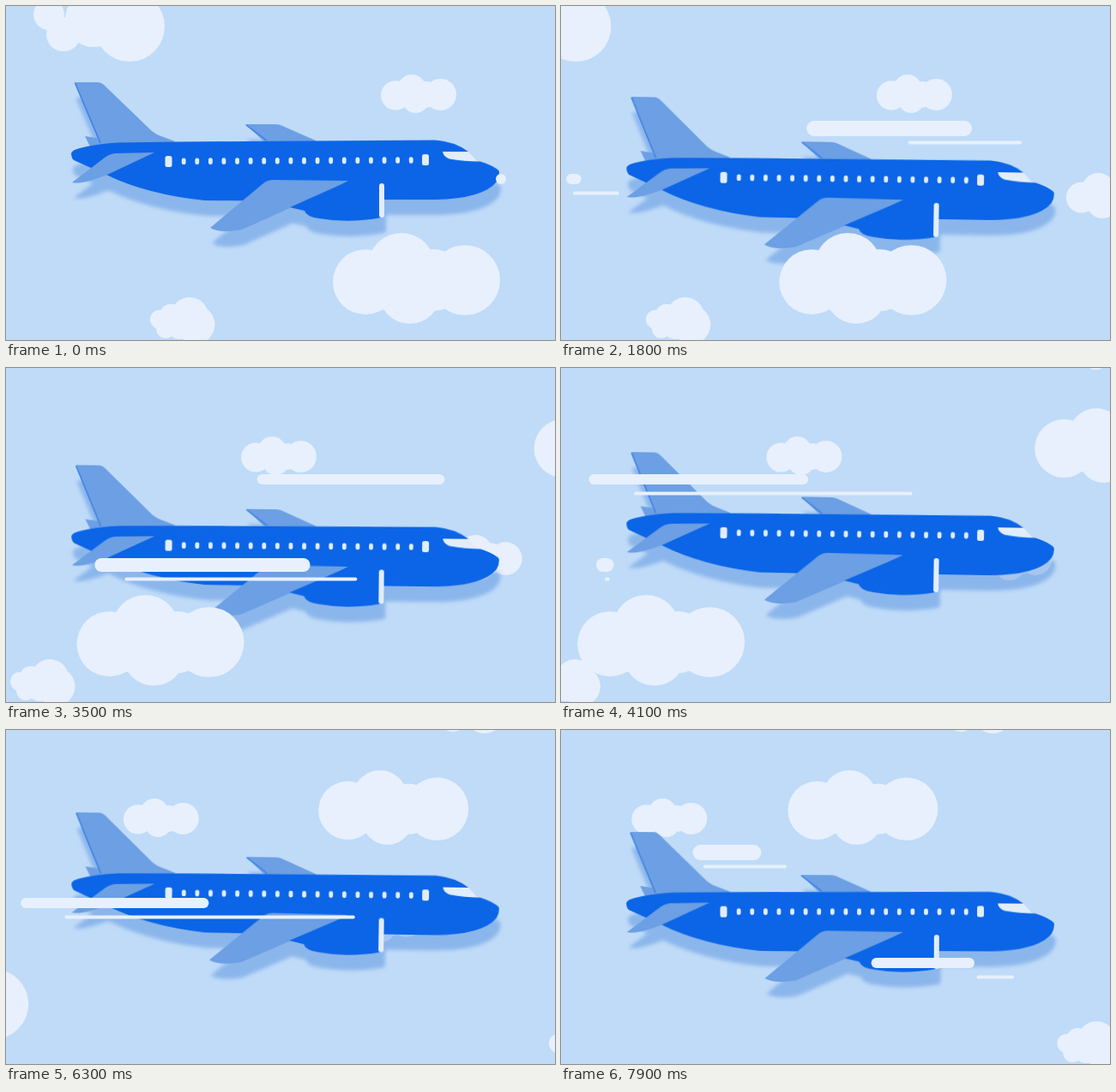
Animation, 640 px wide and 390 px high, one loop 8 s. Source, as an HTML page:

```html
<!DOCTYPE html>
<html lang="en">
<head>
<meta charset="utf-8">
<title>Plane in the clouds</title>
<style>
  html, body { margin: 0; width: 100%; height: 100%; overflow: hidden; background: #bfdbf8; }
  svg { display: block; width: 640px; height: 390px; }
  .cloud { fill: #e7f0fc; }
  .streak { stroke: #e7f0fc; stroke-linecap: round; }
  .body { fill: #0b65e6; }
  .wing { fill: #6c9fe3; }
  .pale { fill: #e2edfc; }
  .edge { fill: none; stroke: #3c80e5; stroke-width: 1.5; }
  #plane { filter: drop-shadow(2px 18px 2px rgba(20, 95, 205, .3)); }
</style>
</head>
<body>
<svg viewBox="0 0 640 390">
  <rect width="640" height="390" fill="#bfdbf8"/>
  <g id="back"></g>
  <g id="plane">
    <path class="wing" d="M80 89H107Q111 89 114 92L170 146Q175 150 181 152L197 158L185 164H111Z"/>
    <path class="wing" d="M92 152L106 154L112 164H98Z"/>
    <path class="edge" d="M80.5 90L110 160"/>
    <path class="wing" d="M279 138H313Q317 138 320 139L361 157V161H304Z"/>
    <path class="edge" d="M280 139L304 157"/>
    <path class="pale" d="M507 168H537L550 182H512Z"/>
    <path class="body" d="M76 172Q77 168 86 166Q104 161 130 159.5L200 158.5L500 156.5Q523 158 539 170H509Q510 176 517 178.5Q534 181.5 553 181.5Q575 189 575 194Q575 200 572 205Q556 225 500 226H440L300 227.5L232 227Q164 220 117 197L79 180Q76 177 76 172Z"/>
    <path class="wing" d="M173 171L127 172Q120 173 115 177L77 206Q88 209 118 197Z"/>
    <path class="wing" d="M399 204L311 203Q305 203 300 207L238 259Q250 266 275 261L333 235L350 230Z"/>
    <path class="body" d="M331 235L398 205H434L437 208V247Q400 254 365 248Q350 246 348 239Z"/>
    <rect class="pale" x="435" y="207" width="6" height="40" rx="3"/>
    <rect class="pale" x="185.5" y="175" width="8" height="13" rx="2.5"/>
    <rect class="pale" x="485" y="173" width="8" height="13" rx="2.5"/>
    <g id="windows"></g>
  </g>
  <g id="streaks"></g>
  <g id="front"></g>
</svg>
<script>
const $ = id => document.getElementById(id);

function add(parent, tag, attrs) {
  const el = document.createElementNS('http://www.w3.org/2000/svg', tag);
  for (const key in attrs) el.setAttribute(key, attrs[key]);
  return parent.appendChild(el);
}

for (let i = 0; i < 18; i++) {
  add($('windows'), 'rect', { class: 'pale', x: 204.8 + i * 15.59, y: 177.5 - i * 0.08, width: 4.8, height: 7.6, rx: 2.2 });
}

// Four lobes (left, top, bottom, right) and two fillers, as [x, y, r]
const puff = (w, h) => [
  [0.195 * w, 0.54 * h, 0.195 * w],
  [0.41 * w, 0.37 * h, 0.37 * h],
  [0.46 * w, 0.66 * h, 0.34 * h],
  [0.79 * w, 0.52 * h, 0.21 * w],
  [0.6 * w, 0.52 * h, 0.34 * h],
  [0.33 * w, 0.55 * h, 0.3 * h]
];
const low = [[11, 26, 11], [24, 21, 13], [18, 37, 11], [46, 22, 22], [53, 32, 22.5], [34, 35, 14]];
const corner = [[18, 10, 18], [35, 33, 20], [112, 24, 41], [70, 15, 33]];
const tip = [[16, -14, 16], [53, -18, 22]];

const clouds = [];
function cloud(layer, shape, x, y, speed) {
  const el = add($(layer), 'g', { class: 'cloud' });
  for (const [cx, cy, r] of shape) add(el, 'circle', { cx, cy, r });
  clouds.push({ el, x, y, speed });
}
const NEAR = 1, FAR = 0.546;
cloud('back', corner, 32, 0, NEAR);
cloud('back', puff(88, 45), 437, 80, FAR);
cloud('back', puff(92, 53), 647, 195, 0.46);
cloud('back', puff(175, 87), 914, 47, NEAR);
cloud('back', tip, 805, 0, FAR);
cloud('back', low, 168, 340, FAR);
cloud('back', low, 933, 340, FAR);
cloud('front', puff(195, 106), 381, 265, NEAR);

const streaks = [];
function streak(y, width, from, to, start, span) {
  const el = add($('streaks'), 'line', { class: 'streak', y1: y, y2: y, 'stroke-width': width });
  streaks.push({ el, from, to, start, span });
}
// A thick streak and the thin one that trails it
function gust(y, width, from, to, start, span, lag) {
  streak(y, width, from, to, start, span);
  streak(y + 16.5, 4, from + 50, to + 4, start + lag, span * 0.9);
}
gust(143, 18, 486, 162, 104, 88, 12);
gust(202, 12, 577, 12, 0, 112, 26);
gust(272, 12, 476, 10, 176, 66, 4);
gust(130, 12, 510, 11, 275, 140, 25);
gust(230, 16, 440, 49, 255, 95, 8);

const PERIOD = 468;
const clamp = u => Math.min(1, Math.max(0, u));
const easeOut = u => 1 - (1 - clamp(u)) ** 3;
const easeSine = u => (1 - Math.cos(Math.PI * clamp(u))) / 2;

// Distance flown: a steady pace that swells in the middle of the loop
const swell = step => 28 * Math.sin((step - 33) * Math.PI / 38);
const distance = step => 8.38 * step + swell(step) - swell(0);

function drawStreak(s, phase) {
  const u = (phase - s.start) / s.span;
  const on = u >= 0 && u < 1.2;
  s.el.setAttribute('visibility', on ? 'visible' : 'hidden');
  if (!on) return;
  const at = f => s.from + (s.to - s.from) * f;
  const head = at(easeOut(u));
  const tail = at(easeSine((u - 0.1) / 1.1));
  s.el.setAttribute('x1', head);
  s.el.setAttribute('x2', Math.max(tail, head + 0.01));
}

function draw(ms) {
  let step = Math.floor((ms % 8000) / 100);
  if (step >= 15) step--;   // one picture is held twice as long
  const d = distance(step);

  for (const c of clouds) c.el.setAttribute('transform', `translate(${c.x - c.speed * d} ${c.y})`);

  // Bob up and down, nose dipping between the two extremes
  const swing = 2 * Math.PI * (d + 7) / PERIOD;
  const bob = 17.3 * (1 - Math.cos(swing));
  const tilt = Math.sin(swing) ** 2;
  $('plane').setAttribute('transform', `translate(0 ${bob}) rotate(${tilt} 330 190)`);

  for (const s of streaks) drawStreak(s, d % PERIOD);
}

const start = performance.now();
function tick() {
  draw(performance.now() - start);
  requestAnimationFrame(tick);
}
tick();
</script>
</body>
</html>
```
